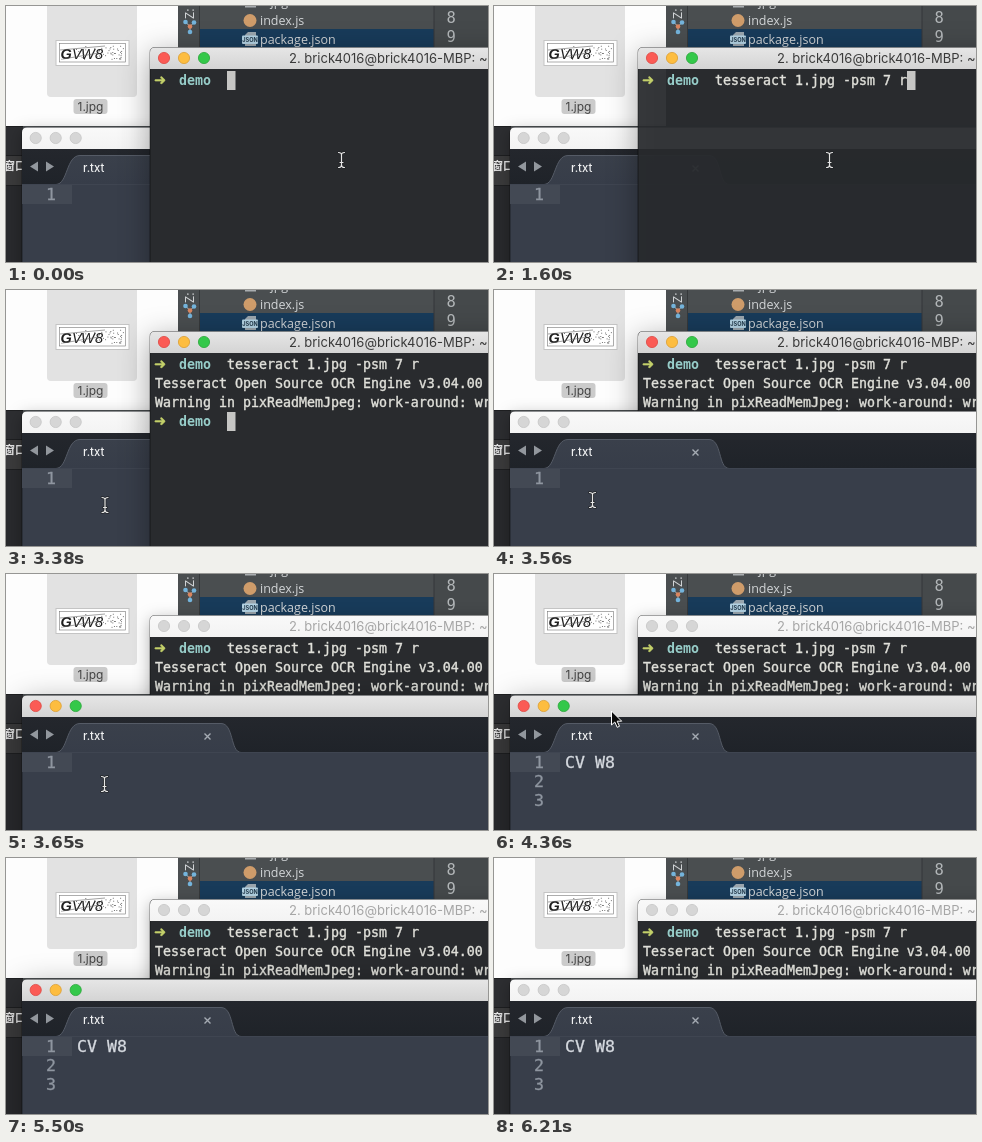
These frames come from a looping animation (482x256 px, 6310 ms). An HTML page:

```html
<!DOCTYPE html>
<html lang="en">
<head>
<meta charset="utf-8">
<title>Reading a captcha with tesseract</title>
<style>
  html, body { margin: 0; width: 100%; height: 100%; overflow: hidden; background: #2b2c2f; }
  svg { display: block; width: 482px; height: 256px; }
  text { white-space: pre; }
  .ui { font-family: Inter, "Open Sans", sans-serif; }
  .tree { font: 12.5px "Open Sans", Inter, sans-serif; fill: #d3d6d8; }
  .term { font: 13.29px "DejaVu Sans Mono", monospace; fill: #e0e0da; stroke: #e0e0da; stroke-width: .4px; }
  .term .dir { fill: #97cdc9; stroke: none; font-weight: bold; }
  .term .arrow { fill: #c3d06a; stroke: #c3d06a; font-family: "DejaVu Sans", sans-serif; font-size: 14.5px; font-weight: bold; }
  .code { font: 16.6px "DejaVu Sans Mono", monospace; fill: #d6dae0; stroke: #d6dae0; stroke-width: .3px; }
  .line { fill: #8f96a0; stroke: #8f96a0; }
  .shade { stroke: rgba(0, 0, 0, .45); filter: drop-shadow(0 4px 8px rgba(0, 0, 0, .3)); }
  .active .shade { filter: drop-shadow(0 7px 15px rgba(0, 0, 0, .36)); }
  .lights circle { fill: #d6d6d6; stroke: #c6c6c6; stroke-width: .8; }
  .bar { fill: url(#barOff); }
  .title { fill: #a6a6a6; }
  .active .bar { fill: url(#barOn); }
  .active .title { fill: #3a3a3a; }
  .active .lights :nth-child(1) { fill: #fb5b55; stroke: #dd4843; }
  .active .lights :nth-child(2) { fill: #fdbd40; stroke: #dc9f33; }
  .active .lights :nth-child(3) { fill: #34c84a; stroke: #2aa73a; }
</style>
</head>
<body>
<svg viewBox="0 0 482 256">
  <defs>
    <linearGradient id="barOn" x2="0" y2="1"><stop stop-color="#e6e6e6"/><stop offset="1" stop-color="#d4d4d4"/></linearGradient>
    <linearGradient id="barOff" x2="0" y2="1"><stop stop-color="#f9f9f9"/><stop offset="1" stop-color="#f3f3f3"/></linearGradient>
    <linearGradient id="tabs" x2="0" y2="1"><stop stop-color="#24272d"/><stop offset="1" stop-color="#1f2329"/></linearGradient>
    <linearGradient id="tab" x2="0" y2="1"><stop stop-color="#3a404b"/><stop offset="1" stop-color="#373d49"/></linearGradient>
    <path id="beamShape" d="M-3 -7.500Q0 -7.500 0 -5V5Q0 7.500 -3 7.500M3 -7.500Q0 -7.500 0 -5M0 5Q0 7.500 3 7.500M-1.500 2.500H1.500"/>
  </defs>

  <!-- project tree and code gutter -->
  <g>
    <rect width="482" height="256" fill="#4a4e50"/>
    <path d="M193.500 0V41" stroke="#36393b"/>
    <text class="tree" transform="translate(188 13) rotate(-90)">Z:</text>
    <path d="M179.500 16L184 20.500L188 16.500M184 20.500V26" stroke="#b3b9bd" fill="none"/>
    <g fill="#74b4dc">
      <circle cx="179.500" cy="16" r="2.300"/><circle cx="188" cy="16.500" r="2.300"/><circle cx="184" cy="26" r="2.300"/>
    </g>
    <circle cx="184" cy="20.500" r="2.300" fill="#d9855f"/>
    <rect x="194" y="23" width="234" height="20" fill="#183b5a"/>
    <rect x="239" width="11" height="1.500" fill="#a9adb0"/>
    <text class="tree" x="254" y="-.5">1.jpg</text>
    <text class="tree" x="254" y="18.500">index.js</text>
    <text class="tree" x="254" y="38">package.json</text>
    <circle cx="244" cy="14.500" r="6.500" fill="#cf9c6a"/>
    <path d="M239 40V29L242 26H250V40Z" fill="#9aa5ad"/>
    <rect x="236" y="29.500" width="16" height="8.500" rx="1" fill="#b4d3e4"/>
    <text class="ui" x="244" y="36" text-anchor="middle" font-size="5.600" font-weight="700" fill="#22394b">JSON</text>
    <rect x="428" width="54" height="42" fill="#45494b"/>
    <path d="M428 0V41" stroke="#34373a"/>
    <g font-family="DejaVu Sans Mono, monospace" font-size="15.500" fill="#b2b6b8">
      <text x="440.500" y="17">8</text><text x="440.500" y="36">9</text>
    </g>
  </g>

  <!-- file window -->
  <g>
    <rect width="172" height="120" fill="#fdfdfd"/>
    <rect x="41" y="-6" width="90" height="97" rx="4" fill="#e2e2e2"/>
    <rect x="50" y="34.500" width="73" height="25" fill="#fff" stroke="#c4c4c4"/>
    <rect x="53.500" y="37.500" width="66" height="18.500" fill="none" stroke="#777" stroke-width=".6"/>
    <g fill="#1e1e1e" font-family="Liberation Sans, sans-serif" font-style="italic" font-size="14.500">
      <text x="54.500" y="52.500" font-weight="700">G</text><text x="66" y="52.500">V</text><text x="75" y="52.500">W</text><text x="89" y="52.500">8</text>
    </g>
    <path d="M54 44L99 40M57 53L93 47" stroke="#666" stroke-width=".6"/>
    <g id="specks" fill="#555"></g>
    <rect x="67.500" y="93" width="34" height="15" rx="3" fill="#cbcbcb"/>
    <text class="ui" x="84.500" y="105" text-anchor="middle" font-size="12" fill="#444">1.jpg</text>
  </g>

  <!-- window peeking out at the left -->
  <g>
    <rect y="120" width="17" height="136" fill="#292a2d"/>
    <rect y="121" width="17" height="29" fill="#2d2e31"/>
    <rect y="150" width="17" height="29" fill="#3b3b3c"/>
    <path d="M0 120.500H17M0 149.500H17M0 179.500H17" stroke="#1e1f21"/>
    <text x="-2" y="164" font-family="Noto Sans CJK SC, Noto Sans CJK, sans-serif" font-size="11" font-weight="700" fill="#e6e6e6">窗口</text>
  </g>

  <g id="windows">
    <g id="editor">
      <rect class="shade" x="16" y="121.500" width="490" height="180" rx="5" fill="#383e4a"/>
      <path class="bar" d="M16 143V126.500Q16 121.500 21 121.500H490V143Z"/>
      <g class="lights"><circle cx="29.700" cy="132" r="5.600"/><circle cx="49.700" cy="132" r="5.600"/><circle cx="69.700" cy="132" r="5.600"/></g>
      <rect x="16" y="143" width="470" height="35" fill="url(#tabs)"/>
      <path d="M16 178.500H50C62 178 60 149.500 74 149.500H215C228 149.500 224 178 235 178.500H490" fill="url(#tab)" stroke="#555b66"/>
      <rect x="16" y="178" width="470" height="1" fill="#3f4551"/>
      <path d="M32 155.500V165.500L24 160.500ZM40 155.500V165.500L48 160.500Z" fill="#92979d"/>
      <text class="ui" x="77" y="166" font-size="11.300" font-weight="500" fill="#f0f1f2">r.txt</text>
      <path d="M198.500 159.500L204.500 165.500M204.500 159.500L198.500 165.500" stroke="#a5abb3" stroke-width="1.400"/>
      <rect x="16" y="179" width="50" height="19" fill="#434954"/>
      <text class="code line" x="40" y="194">1</text>
      <g id="result">
        <text class="code line" x="40" y="213">2</text>
        <text class="code line" x="40" y="232">3</text>
        <text class="code" x="71" y="194">CV W8</text>
      </g>
    </g>

    <g id="terminal">
      <path id="body" class="shade" d="M144 300V46.500Q144 41.500 149 41.500H520V300Z" fill="#292b2e"/>
      <path class="bar" d="M144 63V46.500Q144 41.500 149 41.500H490V63Z"/>
      <g class="lights"><circle cx="158" cy="52" r="5.600"/><circle cx="178" cy="52" r="5.600"/><circle cx="198" cy="52" r="5.600"/></g>
      <text id="title" class="title ui" y="56.500" font-size="13"></text>
      <g class="term">
        <text class="arrow" x="148" y="79">➜</text><text class="dir" x="173" y="79">demo</text>
        <text id="command" x="221" y="79">tesseract 1.jpg -psm 7 r</text>
        <g id="output">
          <text x="149" y="98">Tesseract Open Source OCR Engine v3.04.00 with Leptonica</text>
          <text x="149" y="117">Warning in pixReadMemJpeg: work-around: writing to a temp file</text>
        </g>
        <g id="prompt"><text class="arrow" x="148" y="136">➜</text><text class="dir" x="173" y="136">demo</text></g>
      </g>
      <rect id="block" width="8.500" height="19" fill="#c6c6c4"/>
    </g>
  </g>

  <g id="beam" fill="none" stroke-linecap="round">
    <use href="#beamShape" stroke="#202225" stroke-width="2.600"/>
    <use href="#beamShape" stroke="#e6e6e6" stroke-width="1.200"/>
  </g>
  <path id="pointer" d="M0 0V14L3.300 11L5.700 16.300L8 15.300L5.700 10.200H10.200Z" fill="#0b0b0b" stroke="#fff"/>
</svg>
<script>
  const LOOP = 6310;
  const el = id => document.getElementById(id);
  const show = (id, on) => { el(id).style.display = on ? '' : 'none'; };
  const last = (table, t) => table.filter(row => row[0] <= t).pop();

  // time, cursor shape, x, y
  const mouse = [
    [0, 'beam', 335.5, 154], [2850, 'beam', 322, 150], [2940, 'beam', 236, 146], [3020, 'beam', 137, 145],
    [3200, 'beam', 128, 166], [3290, 'beam', 107, 201], [3380, 'beam', 99, 215],
    [3560, 'beam', 98.5, 210], [3910, 'beam', 106, 205], [4000, 'beam', 124, 201], [4090, 'beam', 140, 198],
    [4360, 'pointer', 117.5, 137], [4450, 'pointer', 97, 86], [4540, 'pointer', 74, 59],
    [4630, 'pointer', 62, 48], [4720, 'pointer', 57, 44],
    [4890, 'pointer', 31, 54], [4980, 'pointer', 64, 92], [5060, 'pointer', 138, 151],
    [5140, 'pointer', 232, 207], [5230, 'pointer', 316, 245], [5410, 'pointer', 329, 250], [5500, 'none', 0, 0]
  ];
  // time, x, y of the terminal cursor
  const block = [[0, 221, 65], [1600, 413, 65], [2410, 149, 84], [2500, 149, 122], [2680, 221, 122]];
  const shell = [283, '2. brick4016@brick4016-MBP: ~'];
  const titles = [[0, ...shell], [2410, 351, '2. tesseract 1.jpg -psm 7 r'], [2760, ...shell]];

  let seed = 7;
  const rnd = () => (seed = seed * 16807 % 2147483647) / 2147483647;
  for (let i = 0; i < 50; i++) {
    const x = 55 + 62 * Math.sqrt(rnd()), y = 39 + 15 * rnd();
    el('specks').innerHTML += `<rect x="${x}" y="${y}" width="1" height=".8"/>`;
  }

  let front = '';
  function draw(t) {
    const top = t < 3560 ? 'terminal' : 'editor';
    if (top !== front) el('windows').append(el(front = top));
    el('terminal').classList.toggle('active', t < 3650);
    el('editor').classList.toggle('active', t >= 3650 && t < 6210);

    // the desktop shows faintly through the terminal while the command waits
    el('body').setAttribute('fill-opacity', t >= 1600 && t < 2410 ? .92 : 1);

    show('command', t >= 1600);
    show('output', t >= 2500);
    show('prompt', t >= 2680);
    show('result', t >= 3740);

    const [, tx, words] = last(titles, t);
    el('title').setAttribute('x', tx);
    el('title').textContent = words;

    const [, bx, by] = last(block, t);
    el('block').setAttribute('x', bx);
    el('block').setAttribute('y', by);

    const [, shape, x, y] = last(mouse, t);
    for (const id of ['beam', 'pointer']) {
      show(id, id === shape);
      el(id).setAttribute('transform', `translate(${x} ${y})`);
    }
  }

  const start = performance.now();
  function tick() {
    draw((performance.now() - start) % LOOP);
    requestAnimationFrame(tick);
  }
  tick();
</script>
</body>
</html>
```
